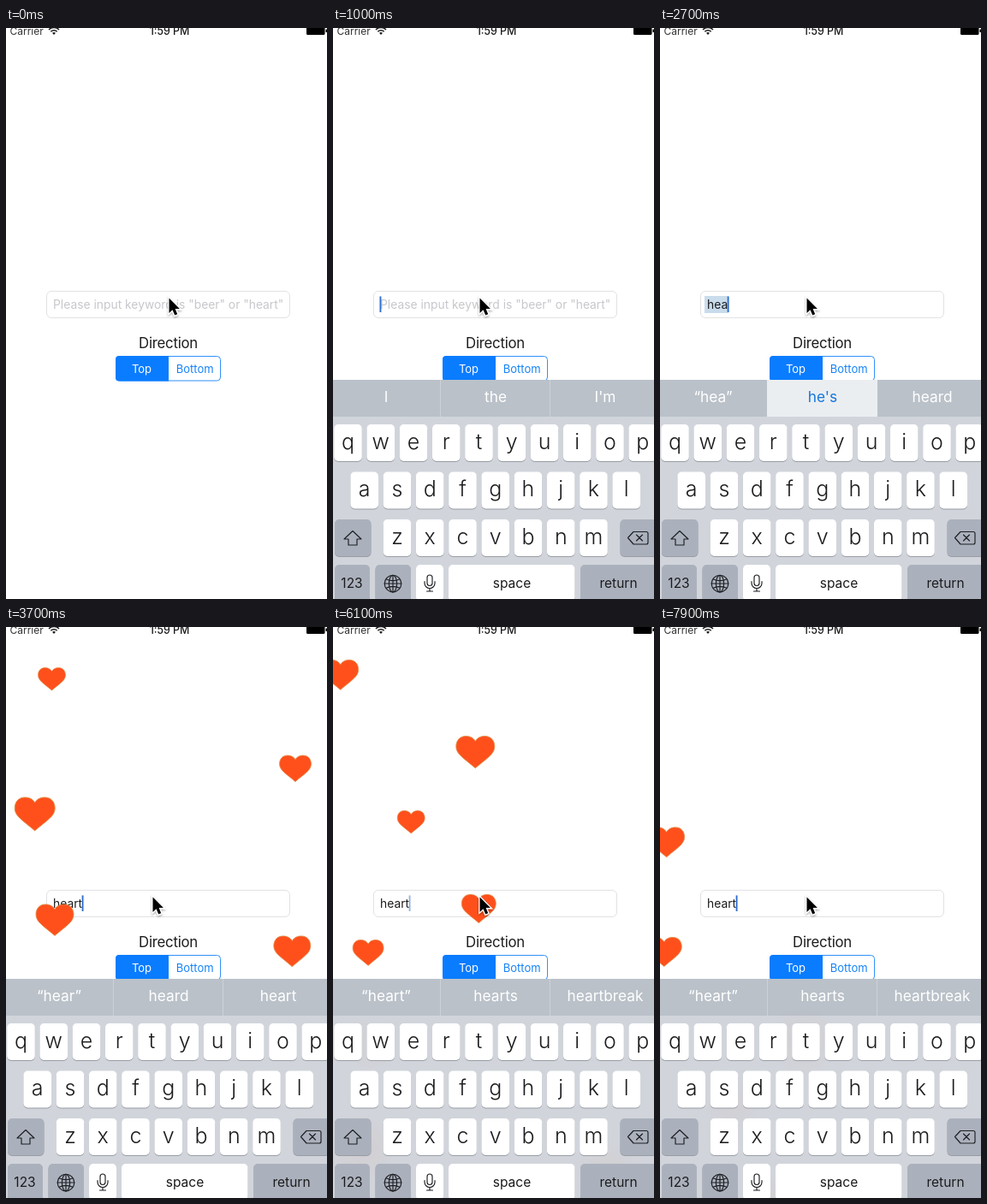
An HTML page that plays this animation: 375 by 667 pixels, repeating every 8 s.

```html
<!DOCTYPE html>
<html lang="en">
<head>
<meta charset="utf-8">
<title>Keyword rain</title>
<style>
  html, body { margin: 0; width: 100%; height: 100%; overflow: hidden; background: #fff; }
  svg { display: block; width: 375px; height: 667px; font-family: Inter, sans-serif; fill: #1c1c1e; }
  .mid text, text.mid { text-anchor: middle; }
  .letter { font-size: 25px; font-weight: 300; }
  .label { font-size: 15.5px; }
  #words { font-size: 17.3px; fill: #fff; }
  #hint, #typed { font-size: 13.85px; }
  .icon { fill: none; stroke: #1c1e22; stroke-width: 1.15; stroke-linejoin: round; stroke-linecap: round; }
</style>
</head>
<body>
<svg viewBox="0 0 375 667">
  <defs>
    <clipPath id="board"><rect y="411" width="375" height="256"/></clipPath>
    <filter id="soft" x="-50%" y="-50%" width="200%" height="200%"><feGaussianBlur stdDeviation="16"/></filter>
    <filter id="drop" x="-50%" y="-50%" width="200%" height="200%">
      <feDropShadow dx="0" dy="1.5" stdDeviation="1.2" flood-opacity=".35"/>
    </filter>
  </defs>

  <g id="status">
    <text x="4.5" y="8.3" font-size="12" fill="#333">Carrier</text>
    <g fill="none" stroke="#1c1c1e" stroke-width="1.6">
      <path d="M50 2A8.5 8.5 0 0 1 62 2M52.3 4.3A5.3 5.3 0 0 1 59.7 4.3"/>
      <path d="M56 8L54 5.8A3 3 0 0 1 58 5.8Z" fill="#1c1c1e" stroke="none"/>
    </g>
    <text class="mid" x="191" y="8.3" font-size="12.4" font-weight="550">1:59 PM</text>
    <rect x="351" y="-3" width="21.5" height="11" rx="1.5" fill="#000"/>
    <rect x="373.5" y="1.5" width="1.5" height="3.5" fill="#000"/>
  </g>

  <rect x="47.5" y="307.5" width="284" height="31" rx="5.5" fill="#fff" stroke="#e2e2e4"/>
  <rect id="mark" x="52" y="313" width="28" height="20" fill="#c9dcec"/>
  <text id="hint" x="55" y="328" fill="#c7c7cd">Please input keyword is "beer" or "heart"</text>
  <text id="typed" x="55" y="328"></text>
  <rect id="caret" y="313.5" width="1.9" height="18.5" fill="#2f6fd0"/>

  <g class="mid">
    <text x="189.5" y="373.5" font-size="16.8" letter-spacing="-.25">Direction</text>
    <rect x="128.5" y="383.5" width="122" height="28.5" rx="4" fill="#fff" stroke="#2f90fc"/>
    <path d="M190 383H132a4 4 0 0 0-4 4v21.5a4 4 0 0 0 4 4h58z" fill="#0a7cff"/>
    <text x="158.5" y="402.5" font-size="13" fill="#fff">Top</text>
    <text x="220.7" y="402.5" font-size="13" fill="#1683f8">Bottom</text>
  </g>

  <g id="hearts"></g>

  <g id="keyboard">
    <rect y="411" width="375" height="256" fill="#d1d5db"/>
    <rect y="411" width="375" height="43" fill="#bac1c9"/>
    <g clip-path="url(#board)" opacity=".08"><use href="#hearts" filter="url(#soft)"/></g>
    <rect id="pick" x="125" y="411" width="129" height="43" fill="#ebeef1"/>
    <path id="bars" d="M125.5 411V454M253.5 411V454" stroke="#cdd2d8"/>
    <g id="words" class="mid"></g>
    <g id="keys" class="mid"></g>
    <g class="icon">
      <path d="M23 587.5L33 597H28V604H18V597H13Z"/>
      <path d="M344.5 595.5L351 588.5H366a2 2 0 0 1 2 2V601a2 2 0 0 1-2 2H351ZM354.5 592l7 7M361.5 592l-7 7"/>
      <circle cx="70" cy="649" r="9.8"/>
      <ellipse cx="70" cy="649" rx="4.6" ry="9.8"/>
      <path d="M60.2 649H79.8M70 639.2V658.8M62 643.8Q70 647.6 78 643.8M62 654.2Q70 650.4 78 654.2"/>
      <rect x="110" y="639" width="6" height="12.5" rx="3"/>
      <path d="M107 646.5V648.5a6 6 0 0 0 12 0V646.5M113 654.5V658M109.5 658H116.5"/>
    </g>
  </g>

  <path id="cursor" d="M0 0V17.4L4 13.8L6.7 20L9.7 18.8L7.1 12.6H12.4Z" fill="#000" stroke="#fff" stroke-width="2.6"
        paint-order="stroke" filter="url(#drop)"/>
</svg>

<script>
const $ = id => document.getElementById(id);
const LOOP = 8000, STEP = 100;

// Keyboard layout
const PITCH = 38.25, KEY_H = 43;
const key = (x, y, w, fill = '#fff') =>
  `<rect x="${x}" y="${y + 1}" width="${w}" height="${KEY_H}" rx="5" fill="#989ca4"/>` +
  `<rect x="${x}" y="${y}" width="${w}" height="${KEY_H}" rx="5" fill="${fill}"/>`;
const label = (x, y, text, cls) => `<text class="${cls}" x="${x}" y="${y}">${text}</text>`;
const letters = (row, x, y) => [...row].map((c, i) => {
  const cx = x + i * PITCH;
  return key(cx - 16.3, y, 32.6) + label(cx, y + 28.5, c, 'letter');
}).join('');
const GREY = '#abb1bc';

$('keys').innerHTML =
  letters('qwertyuiop', 17.5, 463) +
  letters('asdfghjkl', 36.7, 518.5) +
  key(2, 574, 42.5, GREY) + letters('zxcvbnm', 75, 574) + key(335.5, 574, 43, GREY) +
  key(2, 627, 41, GREY) + key(49.5, 627, 41.5, GREY) + key(97, 627, 32) +
  key(135, 627, 147.5) + key(289, 627, 91, GREY) +
  label(22, 654, '123', 'label') + label(209, 654, 'space', 'label') + label(333.5, 654, 'return', 'label');

// Typing: [ms, text]
const TYPING = [[0, ''], [1600, 'h'], [2000, 'he'], [2500, 'hea'], [3000, 'hear'], [3300, 'heart']];
// Suggestions: [ms, left, middle, right]
const WORDS = [
  [0, 'I', 'the', "I'm"],
  [1700, '“h”', 'he', 'how'],
  [2100, '“he”', 'he', 'her'],
  [2500, '“hea”', "he's", 'heard'],
  [3000, '“hear”', 'hears', 'heart'],
  [3300, '“hear”', 'heard', 'heart'],
  [3800, '“heart”', 'hearts', 'heartbreak']
];
const current = (table, t) => table.filter(row => row[0] <= t).pop();

// Hearts: [born ms, known ms, x, top, width, drift px/s, fall px/s]
const HEARTS = [
  [3700, 3700, 53.5, 47.5, 32, -3.7, 179],
  [3700, 3700, 338, 150, 37, -7.5, 196],
  [3700, 3700, 33.7, 199, 47, 0, 164],
  [3700, 3700, 57, 324, 44, 0, 180],
  [3700, 3700, 334.3, 361, 43, 0, 180],
  [4200, 4900, 61.5, 155.5, 36, -17, 175],
  [4600, 4900, 188.3, 81.5, 40, -15, 192.5],
  [4700, 4900, 96, -7.5, 32, -4, 185],
  [5200, 6100, 166.3, 127.5, 45, 0, 190],
  [5400, 6100, 8.7, 38.5, 42, -.6, 108.6],
  [6400, 7900, 4.8, 362.5, 41, 0, 229]
];
const HEART = 'M0 .13C.06 .03 .15 0 .25 0C.4 0 .5 .11 .5 .27C.5 .47 .3 .57 0 .83' +
  'C-.3 .57-.5 .47-.5 .27C-.5 .11-.4 0-.25 0C-.15 0-.06 .03 0 .13Z';
$('hearts').innerHTML =
  HEARTS.map(() => `<path d="${HEART}" fill="#ff501c" stroke="#e0904c" stroke-width=".02"/>`).join('');
const heartNodes = [...$('hearts').children];

const clamp = v => Math.min(1, Math.max(0, v));
const progress = (t, from, to) => clamp((t - from) / (to - from));
const show = (node, on) => node.setAttribute('visibility', on ? 'visible' : 'hidden');
const move = (node, x, y, scale = 1) =>
  node.setAttribute('transform', `translate(${x} ${y}) scale(${scale})`);

function caretOpacity(t) {
  if (t < 800) return 0;
  if (t >= 1600 && t < 3600) return 1;
  const phase = (t % 1000) / 1000;
  return phase < .5 ? clamp((.2 - phase) / .2) : clamp((phase - .5) / .1);
}

function draw(t) {
  const text = current(TYPING, t)[1];
  const [, ...words] = current(WORDS, t);
  const picked = words[1] === "he's";

  $('typed').textContent = text;
  show($('hint'), !text);
  show($('mark'), picked);
  show($('pick'), picked);
  show($('bars'), !picked);
  $('caret').setAttribute('x', 54.5 + (text ? $('typed').getComputedTextLength() : 0));
  $('caret').setAttribute('opacity', caretOpacity(t));
  $('words').innerHTML = words.map((word, i) =>
    `<text x="${62 + 128 * i}" y="437"${picked && i === 1 ? ' fill="#1677dd"' : ''}>${word}</text>`).join('');

  const slide = 1 - (1 - progress(t, 700, 1000)) ** 3;
  move($('keyboard'), 0, 257 * (1 - slide));
  move($('cursor'), 190.5 - 19 * progress(t, 400, 700), 315.5);

  HEARTS.forEach(([born, known, x, top, width, drift, fall], i) => {
    const s = (t - known) / 1000;
    show(heartNodes[i], t >= born);
    move(heartNodes[i], x + drift * s, top + fall * s, width);
  });
}

function frame() {
  const t = (performance.now() + 10) % LOOP;
  draw(Math.floor(t / STEP) * STEP);
  requestAnimationFrame(frame);
}
frame();
</script>
</body>
</html>
```
